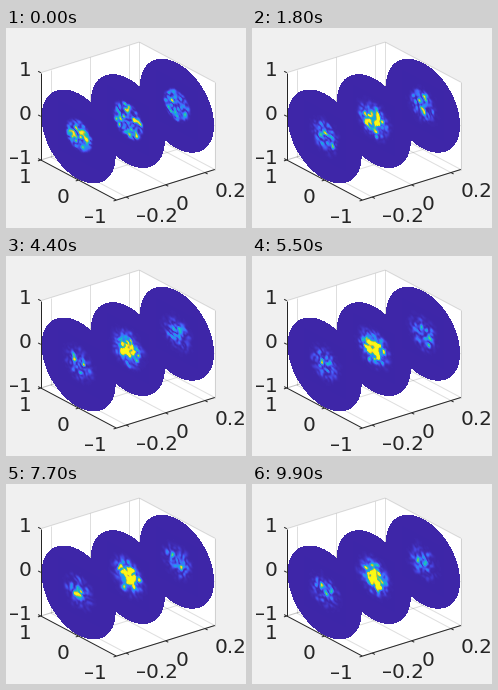
Recreate the animation shown at these times as a matplotlib script. Size 240 by 200 pixels, loop 10 s.

```python
import numpy as np
import matplotlib.pyplot as plt
from matplotlib.animation import FuncAnimation
from matplotlib.colors import LinearSegmentedColormap
from matplotlib.patches import Polygon
from matplotlib.transforms import Affine2D

W, H, DPI = 240, 200, 100
FRAMES, STEP = 100, 100
PX = 72 / DPI
INK = (0.15, 0.15, 0.15)

# Screen position of corner (1, -0.25, -1) and the box edges leaving it
CORNER = np.array([34.8, 132.0])
EX = np.array([75.6, 40.1])
EY = np.array([98.4, -30.6])
EZ = np.array([0.0, -87.3])
YLIM = 0.25
PLANES = (-YLIM, 0, YLIM)
RADIUS = 0.965

parula = LinearSegmentedColormap.from_list("parula", [
    (0.00, (0.242, 0.150, 0.660)), (0.12, (0.278, 0.256, 0.865)),
    (0.25, (0.253, 0.425, 0.998)), (0.38, (0.157, 0.570, 0.940)),
    (0.50, (0.070, 0.695, 0.838)), (0.62, (0.210, 0.765, 0.640)),
    (0.75, (0.504, 0.799, 0.348)), (0.86, (0.860, 0.742, 0.180)),
    (0.93, (0.996, 0.775, 0.219)), (1.00, (0.977, 0.984, 0.081)),
])


def project(x, y, z):
    return (CORNER + (1 - x) / 2 * EX + (y + YLIM) / (2 * YLIM) * EY
            + (z + 1) / 2 * EZ)


fig = plt.figure(figsize=(W / DPI, H / DPI), dpi=DPI, facecolor="#f0f0f0")
ax = fig.add_axes([0, 0, 1, 1])
ax.axis("off")


def line(a, b, color=INK, alpha=1.0, z=1):
    ax.plot(*zip(a, b), color=color, alpha=alpha, lw=PX, zorder=z,
            solid_capstyle="butt")


def edge(a, b):
    line(project(*a), project(*b), alpha=0.15)


def label(tick, dx, dy, value, ha):
    text = str(value).replace("-", "\u2013")
    ax.text(tick[0] + dx, tick[1] + dy + 7.3, text, ha=ha, va="baseline",
            family="DejaVu Sans", size=20 * PX, color=INK)


def draw_box():
    outline = [(1, -YLIM, 1), (1, YLIM, 1), (-1, YLIM, 1),
               (-1, YLIM, -1), (-1, -YLIM, -1), (1, -YLIM, -1)]
    ax.add_patch(Polygon([project(*p) for p in outline], fc="white",
                         ec="none", zorder=0))
    for t in (-1, 0, 1):
        edge((t, -YLIM, -1), (t, YLIM, -1))
        edge((t, YLIM, -1), (t, YLIM, 1))
        edge((1, -YLIM, t), (1, YLIM, t))
        edge((1, YLIM, t), (-1, YLIM, t))
    for t in (-0.2, 0, 0.2):
        edge((1, t, -1), (-1, t, -1))
        edge((1, t, -1), (1, t, 1))


def draw_axes():
    left, front = project(1, -YLIM, -1), project(-1, -YLIM, -1)
    line(left, project(1, -YLIM, 1), z=2)
    line(left, front, z=2)
    line(front, project(-1, YLIM, -1), z=2)
    along_x = EX / np.hypot(*EX) * 3
    along_y = EY / np.hypot(*EY) * 3
    for t in (-1, 0, 1):
        p = project(1, -YLIM, t)
        line(p, p - along_x, z=2)
        label(p, -9.2, -3.8, t, "right")
        p = project(t, -YLIM, -1)
        line(p, p - along_y, z=2)
        label(p, -9.2, 15.8, t, "right")
    for t in (-0.2, 0, 0.2):
        p = project(-1, t, -1)
        line(p, p + along_x, z=2)
        label(p, 9.8, 17.6, t, "left")


def draw_disc(y):
    a = np.linspace(0, 2 * np.pi, 181)
    rim = [project(RADIUS * np.cos(t), y, RADIUS * np.sin(t)) for t in a]
    ax.add_patch(Polygon(rim, fc=parula(0), ec="none", antialiased=False,
                         zorder=3))
    to_screen = Affine2D.from_values(*(-EX / 2), *(EZ / 2), *project(0, y, 0))
    return ax.imshow(np.zeros((N, N)), cmap=parula, vmin=0, vmax=1,
                     extent=(-HALF, HALF, -HALF, HALF), origin="lower",
                     interpolation="bilinear", aspect="auto", zorder=4,
                     transform=to_screen + ax.transData)


# Speckle: band-limited complex noise under a changing envelope
N, HALF = 45, 0.55
grid = np.linspace(-HALF, HALF, N)
r = np.hypot(*np.meshgrid(grid, grid))
freq = np.fft.fftfreq(N, 2 * HALF / N)
band = np.exp(-(np.hypot(*np.meshgrid(freq, freq)) / 6) ** 2)


def speckle_series(keep=0.6):
    rng = np.random.default_rng(7)

    def noise():
        return (rng.normal(size=(3, N, N)) + 1j * rng.normal(size=(3, N, N)))

    state, series = noise(), []
    for _ in range(FRAMES):
        power = np.abs(np.fft.ifft2(np.fft.fft2(state) * band)) ** 2
        series.append(power / power.mean(axis=(1, 2), keepdims=True)
                      if False else power / power.mean(axis=(1, 2))[:, None, None])
        state = keep * state + np.sqrt(1 - keep ** 2) * noise()
    return series


def brightness(power, focus, middle):
    size = 0.38 if middle else 0.33
    flat = 0.4 * np.exp(-(r / size) ** 10) * power ** 0.8
    if middle:
        halo = 0.15 * np.exp(-(r / 0.36) ** 4) * power
        core = 1.9 * np.exp(-(r / 0.2) ** 2) * (0.3 + 0.7 * power)
    else:
        halo = 0.08 * np.exp(-(r / 0.34) ** 4) * power
        core = 0.32 * np.exp(-(r / 0.19) ** 2) * power ** 0.9
    return np.clip((1 - focus) * flat + focus * (halo + core), 0, 1)


SPECKLE = speckle_series()

draw_box()
draw_axes()
images = [draw_disc(y) for y in PLANES]
ax.set_xlim(0, W)
ax.set_ylim(H, 0)


def update(i):
    focus = 1 - np.exp(-i / 16)
    for k, im in enumerate(images):
        im.set_data(brightness(SPECKLE[i][k], focus, k == 1))
    return images


anim = FuncAnimation(fig, update, frames=FRAMES, interval=STEP,
                     init_func=lambda: update(0), repeat=True, repeat_delay=0)
plt.show()
```
